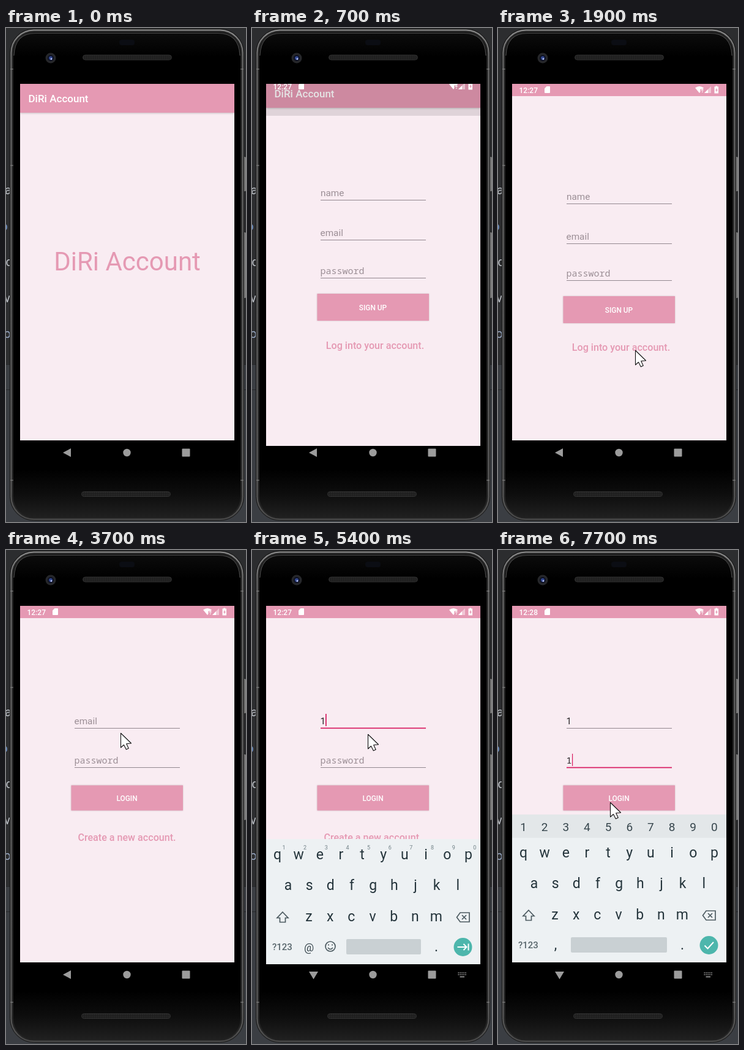
An HTML page for the animation above (8000 ms loop, 392x805 px).

```html
<!DOCTYPE html>
<html lang="en">
<head>
<meta charset="utf-8">
<title>Account app</title>
<style>
html, body { margin: 0; width: 100%; height: 100%; overflow: hidden; background: #2e2f31; }
svg { position: absolute; left: 0; top: 0; display: block; }
.screen { position: absolute; left: 23px; top: 91px; width: 350px; height: 622px; overflow: hidden; background: #000; }
.screen > div { position: absolute; inset: 0; }
text { font-family: Roboto, "Noto Sans", sans-serif; white-space: pre; }
.mid { text-anchor: middle; }
.bold { font-weight: 500; }
.pink { fill: #e599b3; }
.page { fill: #f9ecf2; }
.hint { font-size: 15.33px; fill: #9c8f96; }
.typed { font-size: 15.33px; fill: #2a2528; }
.mono { font-family: "Noto Sans Mono", "DejaVu Sans Mono", monospace; font-size: 15px; font-weight: 300; }
.line { fill: #938890; }
.red { fill: #d81b60; }
.btn { fill: #e599b3; filter: drop-shadow(0 .6px 1px #0003); }
.label { font-size: 11.9px; font-weight: 500; fill: #fff; text-anchor: middle; }
.link { font-size: 16.1px; font-weight: 500; fill: #e599b3; text-anchor: middle; }
.key { font-size: 23px; fill: #24343b; text-anchor: middle; }
.num { font-size: 19px; fill: #37464d; text-anchor: middle; }
.sup { font-size: 9px; fill: #718086; text-anchor: middle; }
.icon { fill: none; stroke: #4d5b61; stroke-width: 1.7; }

/* 1.25% = 100 ms */
.a { animation: 8s step-end infinite; }
.splash { animation-name: splash; }
.signup { animation-name: reveal; }
.slide { animation-name: slide; }
.group { animation-name: settle; }
.bar { animation-name: bar; }
.status { animation-name: status; }
.login { animation-name: login; }
.cursor { animation-name: cursor; }
.navBack { animation-name: navBack; }
.navDown { animation-name: navDown; }
.mailHint { animation-name: mailHint; }
.mailText { animation-name: mailText; }
.mailCaret0 { animation-name: mailCaret0; }
.mailCaret1 { animation-name: mailCaret1; }
.mailLine { animation-name: mailLine; }
.passLine { animation-name: passLine; }
.passHint { animation-name: passHint; }
.passCaret0 { animation-name: passCaret0; }
.passText { animation-name: passText; }
.kbMail { animation-name: kbMail; }
.kbPass { animation-name: kbPass; }
.min7 { animation-name: min7; }
.min8 { animation-name: min8; }

@keyframes splash {
  0% { transform: none; filter: none; }
  6.25% { transform: translateY(-2px); filter: brightness(.97); }
  7.5% { transform: translateY(-5px); filter: brightness(.93); }
  8.75% { transform: translateY(-8px); filter: brightness(.895); }
  10% { transform: translateY(-11px); filter: brightness(.89); }
  11.25%, 100% { transform: translateY(-12px); filter: brightness(.89); visibility: hidden; }
}
@keyframes reveal {
  0% { visibility: hidden; clip-path: inset(580px 0 0 0); }
  6.25% { visibility: visible; clip-path: inset(400px 0 0 0); }
  7.5% { clip-path: inset(160px 0 0 0); visibility: visible; }
  8.75% { clip-path: inset(52px 0 0 0); visibility: visible; }
  10% { clip-path: inset(18px 0 0 0); visibility: visible; }
  11.25% { clip-path: inset(0); visibility: visible; }
  33.75%, 100% { clip-path: inset(0); visibility: hidden; }
}
@keyframes slide {
  0% { transform: translateY(21px); }
  7.5% { transform: translateY(15px); }
  8.75% { transform: translateY(9px); }
  10% { transform: translateY(5px); }
  11.25% { transform: translateY(2px); }
  12.5%, 100% { transform: none; }
}
@keyframes settle {
  0% { transform: translateY(var(--d)); }
  13.75%, 100% { transform: none; }
}
@keyframes bar {
  0% { opacity: 0; }
  11.25% { opacity: .3; }
  12.5% { opacity: .5; }
  13.75% { opacity: .7; }
  15% { opacity: .85; }
  16.25% { opacity: .95; }
  17.5%, 100% { opacity: 1; }
}
@keyframes status {
  0% { transform: translateY(-24px); }
  7.5% { transform: translateY(-14px); }
  8.75% { transform: translateY(-6px); }
  10% { transform: translateY(-2px); }
  11.25%, 100% { transform: none; }
}
@keyframes login { 0% { visibility: hidden; } 33.75%, 100% { visibility: visible; } }
@keyframes cursor {
  0% { transform: translate(330px, 400px); visibility: hidden; }
  18.75% { transform: translate(330px, 400px); visibility: visible; }
  20% { transform: translate(292px, 448px); visibility: visible; }
  21.25% { transform: translate(256px, 492px); visibility: visible; }
  22.5% { transform: translate(232px, 518px); visibility: visible; }
  23.75% { transform: translate(224px, 525px); }
  38.75% { transform: translate(231px, 496px); }
  40% { transform: translate(239px, 420px); }
  41.25% { transform: translate(228px, 318px); }
  42.5% { transform: translate(208px, 236px); }
  43.75% { transform: translate(190px, 200px); }
  45% { transform: translate(181px, 240px); }
  46.25% { transform: translate(187px, 298px); }
  47.5% { transform: translate(188px, 299px); }
  48.75% { transform: translate(189px, 300px); }
  81.25% { transform: translate(186px, 310px); }
  82.5% { transform: translate(180px, 327px); }
  83.75% { transform: translate(177px, 335px); }
  88.75% { transform: translate(178px, 346px); }
  90% { transform: translate(180px, 374px); }
  91.25% { transform: translate(182px, 404px); }
  92.5% { transform: translate(182px, 420px); }
  93.75% { transform: translate(182px, 418px); }
  95% { transform: translate(183px, 413px); }
  96.25%, 100% { transform: translate(183px, 411px); }
}
@keyframes navBack { 0% { visibility: visible; } 61.25%, 100% { visibility: hidden; } }
@keyframes navDown { 0% { visibility: hidden; } 61.25%, 100% { visibility: visible; } }
@keyframes mailHint { 0% { opacity: 1; } 65%, 100% { opacity: 0; } }
@keyframes mailText { 0% { opacity: 0; } 65%, 100% { opacity: 1; } }
@keyframes mailCaret0 { 0% { opacity: 0; } 57.5% { opacity: 1; } 65%, 100% { opacity: 0; } }
@keyframes mailCaret1 { 0% { opacity: 0; } 65% { opacity: 1; } 76.25%, 100% { opacity: 0; } }
@keyframes mailLine { 0% { opacity: 0; } 52.5% { opacity: .5; } 53.75% { opacity: 1; } 76.25%, 100% { opacity: 0; } }
@keyframes passLine { 0% { opacity: 0; } 76.25%, 100% { opacity: 1; } }
@keyframes passHint { 0% { opacity: 1; } 86.25%, 100% { opacity: 0; } }
@keyframes passCaret0 { 0% { opacity: 0; } 76.25% { opacity: 1; } 86.25%, 100% { opacity: 0; } }
@keyframes passText { 0% { opacity: 0; } 86.25%, 100% { opacity: 1; } }
@keyframes kbMail {
  0% { transform: translateY(210px); visibility: hidden; }
  65% { transform: translateY(150px); visibility: visible; }
  66.25% { transform: translateY(40px); visibility: visible; }
  67.5% { transform: translateY(3px); visibility: visible; }
  68.75% { transform: none; visibility: visible; }
  81.25%, 100% { transform: none; visibility: hidden; }
}
@keyframes kbPass { 0% { visibility: hidden; } 81.25%, 100% { visibility: visible; } }
@keyframes min7 { 0% { opacity: 1; } 91.25%, 100% { opacity: 0; } }
@keyframes min8 { 0% { opacity: 0; } 91.25%, 100% { opacity: 1; } }
</style>
</head>
<body>
<svg width="392" height="805">
  <defs>
    <linearGradient id="rim" x2="0" y2="1">
      <stop offset="0" stop-color="#8c8c8c"/><stop offset=".06" stop-color="#6a6a6a"/>
      <stop offset=".94" stop-color="#5c5c5c"/><stop offset="1" stop-color="#4a4a4a"/>
    </linearGradient>
    <linearGradient id="face" x2="0" y2="1">
      <stop offset="0" stop-color="#0c0c0c"/><stop offset=".05" stop-color="#000"/>
      <stop offset=".9" stop-color="#000"/><stop offset=".95" stop-color="#0d0d0d"/>
      <stop offset="1" stop-color="#202020"/>
    </linearGradient>
    <pattern id="mesh" width="3" height="3" patternUnits="userSpaceOnUse">
      <rect width="3" height="3" fill="#1d1d1d"/><rect width="1.5" height="1.5" fill="#303030"/>
    </pattern>
  </defs>
  <rect width="392" height="549" fill="#2c2d2f"/>
  <rect y="549" width="392" height="256" fill="#3b3e43"/>
  <path d="M0 548.5H392M0 589.5H392" stroke="#28292b"/>
  <g font-size="20" fill="#b9bdc3" text-anchor="end">
    <text x="9" y="271">a</text><text x="3" y="330" fill="#6f8fc0">o</text>
    <text x="10" y="388">c</text><text x="7" y="447">v</text><text x="8" y="505" fill="#9aaac6">o</text>
  </g>
  <rect x="386" y="210" width="6" height="56" rx="1.5" fill="#7c7c7c"/>
  <rect x="386" y="333" width="6" height="107" rx="1.5" fill="#7c7c7c"/>
  <rect x="6.5" y="1.5" width="382" height="801" rx="39" fill="#3a3a3a" stroke="#191919"/>
  <rect x="8.5" y="3.5" width="378" height="797" rx="37" fill="#242424" stroke="url(#rim)" stroke-width="2"/>
  <path d="M7 67H12M7 224H12M383 67H388M7 737H12M383 737H388" stroke="#8a8a8a"/>
  <rect x="12" y="7" width="371" height="791" rx="34" fill="url(#face)"/>
  <path d="M13 45Q14 8.500 48 8.500H346Q381 8.500 382 45" fill="none" stroke="#4c4c4c" stroke-width="1.200"/>
  <rect x="185" y="19" width="25" height="9" rx="4" fill="#0b0d13"/>
  <rect x="125.5" y="44" width="145" height="8" rx="4" fill="url(#mesh)" stroke="#2e2e2e"/>
  <rect x="123.5" y="755.5" width="145" height="8" rx="4" fill="url(#mesh)" stroke="#2e2e2e"/>
  <circle cx="73" cy="49" r="8.5" fill="#26272a"/>
  <circle cx="73" cy="49" r="5" fill="#0c1022"/>
  <circle cx="73" cy="49" r="3" fill="#33488f"/>
  <circle cx="74" cy="50.5" r="1.4" fill="#b4c0ee"/>
</svg>

<div class="screen">
  <div class="a splash">
    <svg viewBox="23 91 350 622" width="350" height="622">
      <rect class="page" x="23" y="91" width="350" height="581"/>
      <rect class="pink" x="23" y="91" width="350" height="47" style="filter:drop-shadow(0 1px 1.5px #0003)"/>
      <text class="bold" x="36.5" y="121" font-size="17" fill="#fff">DiRi Account</text>
      <text class="mid pink" x="198" y="395" font-size="42">DiRi Account</text>
    </svg>
  </div>

  <div class="a signup"><div class="a slide">
    <svg viewBox="23 91 350 622" width="350" height="622">
      <rect class="page" x="23" y="91" width="350" height="581"/>
      <rect class="a bar pink" x="23" y="91" width="350" height="20"/>
      <g class="a group" style="--d:-15px">
        <text class="hint" x="112" y="280">name</text>
        <rect class="line" x="112" y="286" width="172" height="1"/>
      </g>
      <g class="a group" style="--d:-15px">
        <text class="hint" x="111.5" y="345">email</text>
        <rect class="line" x="112" y="351" width="172" height="1"/>
      </g>
      <g class="a group" style="--d:-13px">
        <text class="hint mono" x="111.5" y="405">password</text>
        <rect class="line" x="112" y="411" width="172" height="1"/>
      </g>
      <g class="a group" style="--d:-13px">
        <rect class="btn" x="106.5" y="437" width="182.5" height="44"/>
        <text class="label" x="197.5" y="463.5">SIGN UP</text>
      </g>
      <g class="a group" style="--d:-12px">
        <text class="link" x="201" y="525.5">Log into your account.</text>
      </g>
    </svg>
  </div></div>

  <div class="a login">
    <svg viewBox="23 91 350 622" width="350" height="622">
      <rect class="page" x="23" y="91" width="350" height="581"/>
      <rect class="pink" x="23" y="91" width="350" height="20"/>
      <text class="a mailHint hint" x="111.5" y="283.5">email</text>
      <text class="a mailText typed" x="111.5" y="283.5">1</text>
      <rect class="line" x="112" y="290" width="172" height="1"/>
      <rect class="a mailLine red" x="112" y="289.5" width="172" height="1.7"/>
      <rect class="a mailCaret0 red" x="112" y="267" width="1.7" height="20"/>
      <rect class="a mailCaret1 red" x="120" y="267" width="1.7" height="20"/>
      <text class="a passHint hint mono" x="111.5" y="348">password</text>
      <text class="a passText typed mono" x="111.5" y="348">1</text>
      <rect class="line" x="112" y="354" width="172" height="1"/>
      <rect class="a passLine red" x="112" y="353.7" width="172" height="1.7"/>
      <rect class="a passCaret0 red" x="112" y="332" width="1.5" height="20"/>
      <rect class="a passText red" x="121" y="332" width="1.2" height="20"/>
      <rect class="btn" x="106.5" y="383.5" width="182.5" height="41"/>
      <text class="label" x="197.5" y="408.5">LOGIN</text>
      <text class="link" x="197.5" y="474">Create a new account.</text>
    </svg>
  </div>

  <svg viewBox="23 91 350 622" width="350" height="622">
    <g class="a status" fill="#fff">
      <text class="a min7 bold" x="34.5" y="105.5" font-size="12">12:27</text>
      <text class="a min8 bold" x="34.5" y="105.5" font-size="12">12:28</text>
      <path d="M79.5 95H84Q85 95 85 96V105Q85 106 84 106H77Q76 106 76 105V98.5Z"/>
      <path d="M322 97.5Q329 92.5 336 97.5L334.5 99.5H330.5V104L329 106Z"/>
      <path d="M332 101H335.5M333 104H334.5" stroke="#fff" stroke-width="1.5"/>
      <path d="M337 106L348 95V106Z" opacity=".45"/><path d="M337 106L343 100V106Z"/>
      <path d="M355.5 94.5H358V95.5H360V106.5H353.5V95.5H355.5Z"/>
      <path class="pink" d="M357.5 97.5L355 101.7H356.5V104.8L359 100.5H357.5Z"/>
    </g>
    <g class="a kbMail" id="mail"></g>
    <g class="a kbPass" id="pass"></g>
    <g fill="#9c9c9c">
      <path class="a navBack" d="M93 692L106 685V699Z"/>
      <path class="a navDown" d="M93 687H108L100.5 699.5Z"/>
      <circle cx="197.5" cy="692" r="6.2"/>
      <rect x="287.5" y="685.5" width="13" height="13" rx="1"/>
      <g class="a navDown" fill="none" stroke="#9c9c9c" stroke-width="1.7">
        <path d="M336.5 689H350M336.5 692H350" stroke-dasharray="1.7 1.2"/><path d="M339.5 695.5H347"/>
      </g>
    </g>
  </svg>
</div>

<svg width="392" height="805">
  <path class="a cursor" d="M.5 .5V24L5.5 19.5L9.3 27L13.2 25.2L9.7 17.7L17.5 17Z" fill="#fff" stroke="#111" stroke-width="1.1" stroke-linejoin="round"/>
</svg>

<script>
const STEP = 34.65;
const rect = (x, y, w, h, fill, r = 0) =>
  `<rect x="${x}" y="${y}" width="${w}" height="${h}" rx="${r}" fill="${fill}"/>`;
const row = (chars, x, y, cls) => [...chars].map((c, i) =>
  `<text class="${cls}" x="${x + i * STEP}" y="${y}">${c}</text>`).join('');
const icon = (d, extra = '') => `<path class="icon" d="${d}" ${extra}/>`;

// Parts shared by both keyboards; spaceX is the left end of the space bar.
const keys = spaceX =>
  rect(23, 468, 350, 204, '#edf1f3') +
  row('qwertyuiop', 41.5, 501, 'key') +
  row('asdfghjkl', 59, 551, 'key') +
  row('zxcvbnm', 93, 601.5, 'key') +
  icon('M50 587L59 596.5H54.5V603.5H45.5V596.5H41Z') +
  icon('M340 588H355V603H340L334.5 595.5ZM343 592L350 599M350 592L343 599') +
  `<text x="33" y="649" font-size="15" class="bold" fill="#58666c">?123</text>` +
  rect(spaceX, 631, 276 - spaceX, 25, '#c9d0d3', 2) +
  row('.', 301, 651, 'key') +
  `<circle cx="344.5" cy="644" r="15" fill="#4db6ac"/>`;

const white = 'style="stroke:#fff;stroke-width:2"';
document.getElementById('mail').innerHTML = keys(154) +
  row('1234567890', 52, 484.5, 'sup') +
  `<text x="93" y="651" font-size="18" class="mid" fill="#37464d">@</text>` +
  `<circle class="icon" cx="128" cy="643" r="8"/>` +
  icon('M124 645Q128 650 132 645M125 639.5V641.5M131 639.5V641.5') +
  icon('M335.5 644H350M345.5 639L350.5 644L345.5 649M353.5 638.5V649.5', white);
document.getElementById('pass').innerHTML = keys(119) +
  rect(23, 431, 350, 38, '#e3e7e9') +
  row('1234567890', 41.5, 458, 'num') +
  row(',', 94, 651, 'key') +
  icon('M337.5 644.5L342.5 649.5L352 639', white);
</script>
</body>
</html>
```
